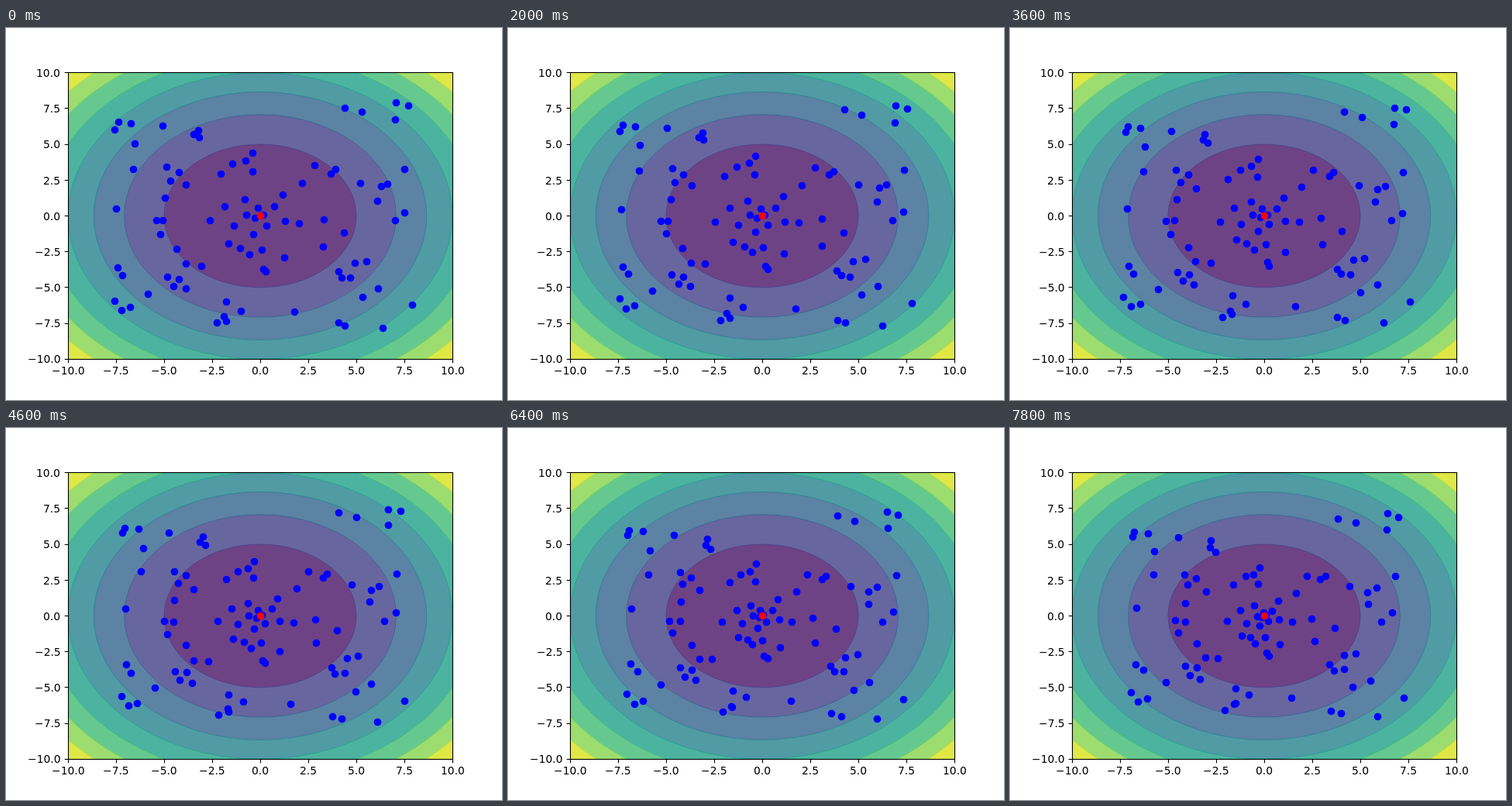
Animation of 640 by 480 pixels, one loop 8 s. Source, as an HTML page with a canvas:

```html
<!DOCTYPE html>
<html lang="en">
<head>
<meta charset="utf-8">
<title>Particle swarm</title>
<style>
  html, body { margin: 0; width: 100%; height: 100%; overflow: hidden; background: #fff; }
  canvas { display: block; width: 640px; height: 480px; }
</style>
</head>
<body>
<canvas id="stage" width="640" height="480"></canvas>
<script>
const ctx = document.getElementById("stage").getContext("2d");
const LOOP = 8000, STEP = 200, LAST = LOOP / STEP - 1;
const LEFT = 80, RIGHT = 576, TOP = 57.6, BOTTOM = 427.2;
const CX = (LEFT + RIGHT) / 2, CY = (TOP + BOTTOM) / 2;
const UNIT_X = (RIGHT - LEFT) / 20, UNIT_Y = (BOTTOM - TOP) / 20;
const DOT = 4.86, LINE = 1.11, TICK = 4.86;

// Where the scattered particles start; the dense core is generated below
const scattered = [
  [140,131], [145,121], [161,123], [202,126], [166,149], [164,182], [248,132], [242,137],
  [249,141], [207,179], [223,186], [212,197], [232,202], [205,219], [142,233], [194,248],
  [202,248], [199,266], [220,285], [277,188], [318,161], [309,171], [410,247], [409,282],
  [332,311], [302,284], [314,292], [252,307], [232,304], [144,309], [150,319], [208,321],
  [223,324], [216,333], [232,336], [183,343], [140,352], [149,364], [160,360], [284,353],
  [303,365], [281,372], [284,378], [272,380], [372,366], [429,314], [433,322], [444,322],
  [450,303], [465,301], [480,336], [460,347], [524,357], [429,380], [437,384], [486,387],
  [436,264], [398,177], [425,182], [419,188], [457,200], [484,204], [492,201], [479,223],
  [514,182], [514,238], [502,248], [437,103], [459,108], [502,118], [503,96], [519,100]
];

// Repeatable random number from -1 to 1
function noise(seed) {
  const s = Math.sin(seed * 12.9898) * 43758.5453;
  return (s - Math.floor(s)) * 2 - 1;
}

const core = Array.from({ length: 21 }, (_, i) => {
  const angle = i * 2.4 + noise(i) * 0.4, r = 4 + i * 3.6;
  return [CX + r * Math.cos(angle), CY + r * Math.sin(angle)];
});

// Every particle heads for the centre by about the same distance
const swarm = [...scattered, ...core].map(([x, y], i) => {
  const r = Math.hypot(x - CX, y - CY);
  const pull = 21 * (1 - Math.exp(-r / 35));
  const spread = pull / 6;
  return {
    x, y,
    dx: (CX - x) / r * pull + spread * noise(i + 200),
    dy: (CY - y) / r * pull + spread * noise(i + 400)
  };
});

// Colour bands from the centre outwards, shown at 80 % over white
const bands = [
  [72,20,103], [66,64,134], [51,99,141], [38,130,142],
  [31,160,136], [63,188,115], [132,212,75], [216,226,25]
];
const rgb = c => `rgb(${c.join()})`;
const tint = c => rgb(c.map(v => Math.round(v * 0.8 + 51)));
const snap = v => Math.floor(v) + 0.5;

function ring(level) {
  const r = Math.sqrt(level);
  ctx.beginPath();
  ctx.ellipse(CX, CY, r * UNIT_X, r * UNIT_Y, 0, 0, Math.PI * 2);
}

function drawBands() {
  ctx.save();
  ctx.beginPath();
  ctx.rect(LEFT, TOP, RIGHT - LEFT, BOTTOM - TOP);
  ctx.clip();
  ctx.lineWidth = 0.9;
  for (let i = bands.length - 1; i >= 0; i--) {
    ring((i + 1) * 25);
    ctx.fillStyle = tint(bands[i]);
    ctx.fill();
    if (i === bands.length - 1) continue;
    // neighbouring bands overlap in a thin, darker seam
    ctx.globalAlpha = 0.8;
    ctx.strokeStyle = rgb(bands[i + 1]);
    ctx.stroke();
    ctx.globalAlpha = 1;
  }
  ctx.restore();
}

function line(x1, y1, x2, y2) {
  ctx.beginPath();
  ctx.moveTo(x1, y1);
  ctx.lineTo(x2, y2);
  ctx.stroke();
}

function drawAxes() {
  const x0 = snap(LEFT), x1 = snap(RIGHT), y0 = snap(TOP), y1 = snap(BOTTOM);
  ctx.strokeStyle = ctx.fillStyle = "#000";
  ctx.lineWidth = LINE;
  ctx.strokeRect(x0, y0, x1 - x0, y1 - y0);
  ctx.font = '13.89px "DejaVu Sans", sans-serif';
  for (let v = -10; v <= 10; v += 2.5) {
    const label = v.toFixed(1).replace("-", "\u2212");
    const width = ctx.measureText(label).width;
    const x = CX + v * UNIT_X, y = CY - v * UNIT_Y;
    line(snap(x), y1, snap(x), y1 + TICK);
    line(x0, snap(y), x0 - TICK, snap(y));
    ctx.fillText(label, Math.round(x - width / 2), 447);
    ctx.fillText(label, Math.round(LEFT - 2 * TICK - width), Math.round(y + 5.3));
  }
}

function dot(x, y, color) {
  ctx.beginPath();
  ctx.arc(Math.round(x) + 0.5, Math.round(y) + 0.5, DOT, 0, Math.PI * 2);
  ctx.fillStyle = color;
  ctx.fill();
}

function drawSwarm(step) {
  const p = Math.pow(step / LAST, 1.12);
  const shake = Math.min(1, step / 3);
  swarm.forEach(({ x, y, dx, dy }, i) => {
    const seed = i * 97 + step * 2 + 1;
    dot(x + dx * p + shake * noise(seed), y + dy * p + shake * noise(seed + 1), "#00f");
  });
  dot(CX, CY, "#f00");
}

function frame(time) {
  ctx.fillStyle = "#fff";
  ctx.fillRect(0, 0, 640, 480);
  drawBands();
  drawSwarm(Math.floor((time % LOOP) / STEP));
  drawAxes();
}

const start = performance.now();
function tick() {
  frame(performance.now() - start);
  requestAnimationFrame(tick);
}
tick();
</script>
</body>
</html>
```
